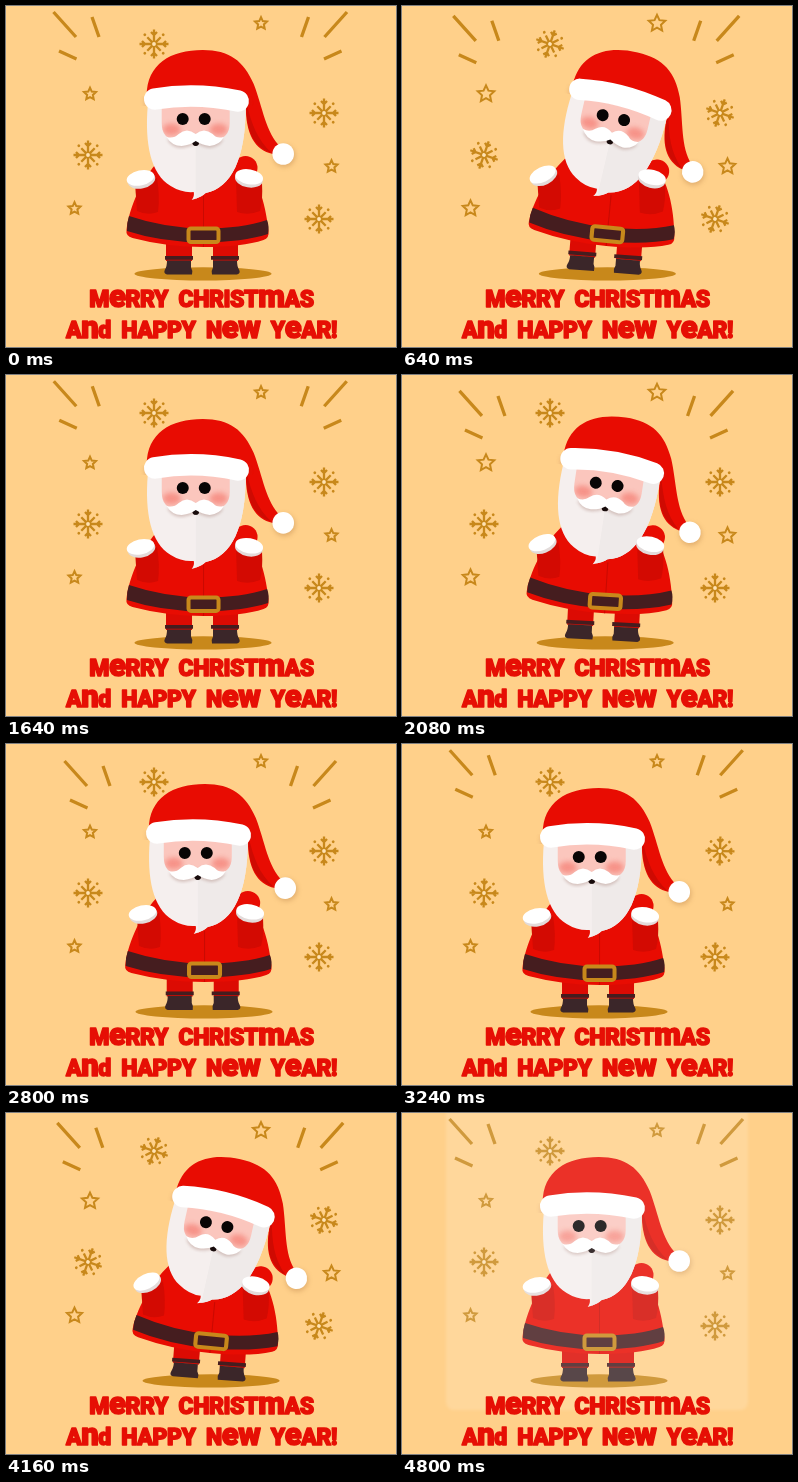
Write an HTML page that moves like this. It is 390 px wide and 341 px high and loops after 4840 ms.

```html
<!DOCTYPE html>
<html lang="en">
<head>
<meta charset="utf-8">
<title>Merry Christmas</title>
<style>
  html, body { margin: 0; width: 100%; height: 100%; overflow: hidden; background: #ffd08a; }
  svg { display: block; width: 100%; height: 100%; }
  .line { font-family: Roboto, Inter, sans-serif; font-weight: 900; font-size: 23px;
          letter-spacing: -.4px; word-spacing: 5px;
          fill: #e60f05; stroke: #e60f05; stroke-width: 1.5; stroke-linejoin: round; text-anchor: middle; }
  .tall { font-size: 31px; }
  .gold { fill: none; stroke: #c8881b; }
</style>
</head>
<body>
<svg viewBox="0 0 390 341">
  <defs>
    <filter id="soft" x="-50%" y="-50%" width="200%" height="200%"><feGaussianBlur stdDeviation="2.5"/></filter>
    <filter id="edge"><feGaussianBlur stdDeviation="1.5"/></filter>
    <clipPath id="rightHalf"><rect x="190" y="90" width="60" height="110"/></clipPath>
    <path id="face" d="M156 92H224V117Q224 133 208 134H172Q156 134 156 117Z"/>
    <clipPath id="faceClip"><use href="#face"/></clipPath>
    <path id="beard" d="M142 100C139 138 145 168 165 180Q176 187 188 186Q189 190 186 194Q196 191 200 187C226 182 240 152 240 100Z"/>
    <path id="stache" d="M190 128Q181 121 173 128Q168 133 161 131Q166 140 176 140Q185 139 190 135Q196 139 204 140Q214 139 218 131Q211 133 207 128Q198 121 190 128Z"/>
    <path id="rays" d="M47.5 6L70 31M86 11L93 31M53 45L70.500 53"/>
    <g id="flake"></g>
  </defs>
  <rect width="390" height="341" fill="#ffd08a"/>

  <g class="gold" stroke-width="3.300">
    <use href="#rays" id="rayL"/>
    <use href="#rays" id="rayR"/>
  </g>
  <g id="sky" class="gold"></g>

  <ellipse id="shadow" cx="197" cy="267.800" rx="68.500" ry="6.600" fill="#c8881b"/>

  <g id="legs">
    <path d="M160 230h26v25h-26zM207 230h25v25h-25z" fill="#dc0b03"/>
    <path d="M161 254.500h24v7q2 3 1 7h-25q-4-1-2-5q2-3 2-9zM207 254.500h24q0 6 2 9q2 4-2 5h-25q-1-4 1-7z" fill="#3b2629"/>
    <path d="M159 250h28v3.800h-28zM205 250h28v3.800h-28z" fill="#451d1f"/>
  </g>

  <g id="body">
    <ellipse cx="239" cy="162" rx="12" ry="12" fill="#e80c02"/>
    <path d="M152 155C137 171 123 199 120 224Q119 230 126 232Q160 241 197 241Q236 241 257 234Q263 232 262 225C259 195 250 170 236 155Z" fill="#e80c02"/>
    <path d="M197 190V241" stroke="#c90a02" stroke-width="1"/>
    <path d="M122.500 210Q158 222 197 222.500Q235 222.500 260.500 214Q263 220 261.500 228Q236 236 197 236.500Q154 236 120.500 225Q120 217 122.500 210Z" fill="#451d1f"/>
    <rect x="182" y="222.500" width="30" height="13.500" rx="2.500" fill="none" stroke="#c8881b" stroke-width="4"/>
  </g>

  <g id="head">
    <path d="M141 90C141 58 165 44 197 44C224 44 238 55 248 78C257 101 260 127 275 141L267 148C249 144 240 128 240 99Z" fill="#e80c02"/>
    <path d="M241 98C240 124 247 140 266 147C251 133 246 118 241 98Z" fill="#cf0a02"/>
    <circle cx="278.500" cy="150" r="11" fill="#a86d38" opacity=".35" filter="url(#soft)"/>
    <circle cx="277.500" cy="148" r="10.800" fill="#fff"/>
    <use href="#beard" fill="#f5efee"/>
    <use href="#beard" fill="#efeae9" clip-path="url(#rightHalf)"/>
    <use href="#face" fill="#fbc6bd"/>
    <g clip-path="url(#faceClip)">
      <g fill="#f4786d" opacity=".65" filter="url(#soft)">
        <ellipse cx="166" cy="123.500" rx="9" ry="6"/>
        <ellipse cx="213" cy="123.500" rx="9" ry="6"/>
      </g>
    </g>
    <circle cx="177" cy="113" r="6" fill="#080505"/>
    <circle cx="199" cy="113" r="6" fill="#080505"/>
    <circle cx="190" cy="136.500" r="3.400" fill="#170b0b"/>
    <use href="#stache" y="2" fill="#8e5b50" opacity=".3" filter="url(#edge)"/>
    <circle cx="190" cy="136.500" r="3" fill="#170b0b"/>
    <use href="#stache" fill="#fff"/>
    <path d="M149 96Q190 89 233 97" fill="none" stroke="#8e3b2a" stroke-width="20" stroke-linecap="round" opacity=".25" filter="url(#soft)"/>
    <path d="M149 93Q190 86 232.500 95" fill="none" stroke="#fff" stroke-width="21.500" stroke-linecap="round"/>
  </g>

  <g id="armL">
    <path d="M129 177L151 172Q154 191 152 206Q142 210 131 205Z" fill="#d30a02"/>
    <g id="handL">
      <ellipse cx="135" cy="174" rx="14" ry="8.500" fill="#e2dbda"/>
      <ellipse cx="134.500" cy="171.800" rx="14" ry="7.500" fill="#fff"/>
    </g>
  </g>
  <g id="armR">
    <path d="M230 172L256 177Q257 194 254 205Q242 210 231 206Z" fill="#d30a02"/>
    <g id="handR">
      <ellipse cx="243" cy="173" rx="14" ry="8.500" fill="#e2dbda"/>
      <ellipse cx="243" cy="170.800" rx="14" ry="7.500" fill="#fff"/>
    </g>
  </g>

  <rect id="veil" x="44" y="-8" width="302" height="305" rx="8" fill="#fff" filter="url(#edge)"/>

  <text class="line" x="195.500" y="301.300"></text>
  <text class="line" x="195.500" y="332"></text>
</svg>
<script>
const LOOP = 4840, STEP = 40, BEAT = 800, SWAY = 1600, REST = 4400;
const $ = id => document.getElementById(id);
const move = (id, x, y, extra = '') => $(id).setAttribute('transform', `translate(${x} ${y})${extra}`);
const clamp = x => Math.min(1, Math.max(0, x));
const ease = (a, b, t) => { const x = clamp((t - a) / (b - a)); return x * x * (3 - 2 * x); };
const bump = (a, b, c, d, t) => ease(a, b, t) * (1 - ease(c, d, t));

// Letters of mixed case share one height
const lines = ['MeRRY CHRISTmAS', 'And HAPPY New YeAR!'];
document.querySelectorAll('.line').forEach((el, i) => {
  el.innerHTML = lines[i].replace(/[emnw]+/g, s => `<tspan class="tall">${s}</tspan>`);
});

// Snowflake: four long arms with twigs, four short ones ending in dots
let arms = '';
for (let a = 0; a < 360; a += 90) {
  arms += `<g transform="rotate(${a})"><path d="M2 0H14.500M12 -3L9 0L12 3" stroke-width="2.300"/></g>` +
    `<g transform="rotate(${a + 45})"><path d="M2 0H9.500" stroke-width="2.300"/>` +
    `<circle r="1.400" cx="13" fill="#c8881b" stroke="none"/></g>`;
}
$('flake').innerHTML = arms + '<circle r="2.700" fill="#ffe3b4" stroke-width="1.600"/>';

const starPath = Array.from({ length: 10 }, (_, i) => {
  const r = i % 2 ? 0.48 : 1, a = (i / 5 - 0.5) * Math.PI;
  return `${(r * Math.cos(a)).toFixed(3)} ${(r * Math.sin(a)).toFixed(3)}`;
}).join('L');
const flakes = [[148, 38], [318, 107], [82, 149], [313, 213]];
const stars = [[255, 17.5], [84, 88], [325.5, 160.5], [68.5, 202.5]];
$('sky').innerHTML =
  flakes.map((_, i) => `<use href="#flake" id="flake${i}"/>`).join('') +
  stars.map((_, i) => `<path id="star${i}" d="M${starPath}Z" stroke-width="2" vector-effect="non-scaling-stroke"/>`).join('');

function draw(now) {
  const t = now < REST ? now : 0;
  const p = t % SWAY;
  const up = (1 - Math.cos(2 * Math.PI * t / BEAT)) / 2;
  const lean = bump(310, 590, 930, 1210, p);
  const grow = bump(180, 450, 900, 1190, p);
  const spin = 20 * Math.max(0, Math.sin(Math.PI * t / SWAY));

  move('rayL', 11 * up, 11 * up);
  move('rayR', 388.5 - 11 * up, 11 * up, ' scale(-1 1)');
  flakes.forEach(([x, y], i) => move('flake' + i, x, y, ` rotate(${spin})`));
  stars.forEach(([x, y], i) => move('star' + i, x, y, ` scale(${6.3 + (i < 2 ? 2.4 : 1.8) * grow})`));

  move('shadow', up + 8 * lean, 0);
  move('legs', 0.7 * up + 6 * lean, -2.5 * up, ` rotate(${4.5 * lean} 218 264)`);
  const wide = 1 + 0.03 * Math.max(up, lean);
  move('body', 197.5 + up + 7.5 * lean, 229 - 3 * up, ` rotate(${5.5 * lean}) scale(${wide} 1) translate(-197 -229)`);
  move('head', 187.7 + 2 * up + 23 * lean, 113 - 4 * up, ` rotate(${13 * lean}) translate(-188 -113)`);
  move('armL', 2 * up + 5.5 * lean, -3 * up - 2.5 * lean);
  move('armR', up + 6.5 * lean, -3 * up + 1.5 * lean);
  move('handL', 0, 0, ` rotate(${-12 - 14 * lean} 135 172)`);
  move('handR', 0, 0, ` rotate(${10 + 4 * lean} 243 172)`);

  const fade = clamp((now - 4440) / 360);
  $('veil').setAttribute('opacity', 0.15 * Math.pow(fade, 1.3));
}

const start = performance.now();
function tick() {
  const t = (performance.now() - start) % LOOP;
  draw(Math.floor(t / STEP) * STEP);
  requestAnimationFrame(tick);
}
tick();
</script>
</body>
</html>
```
